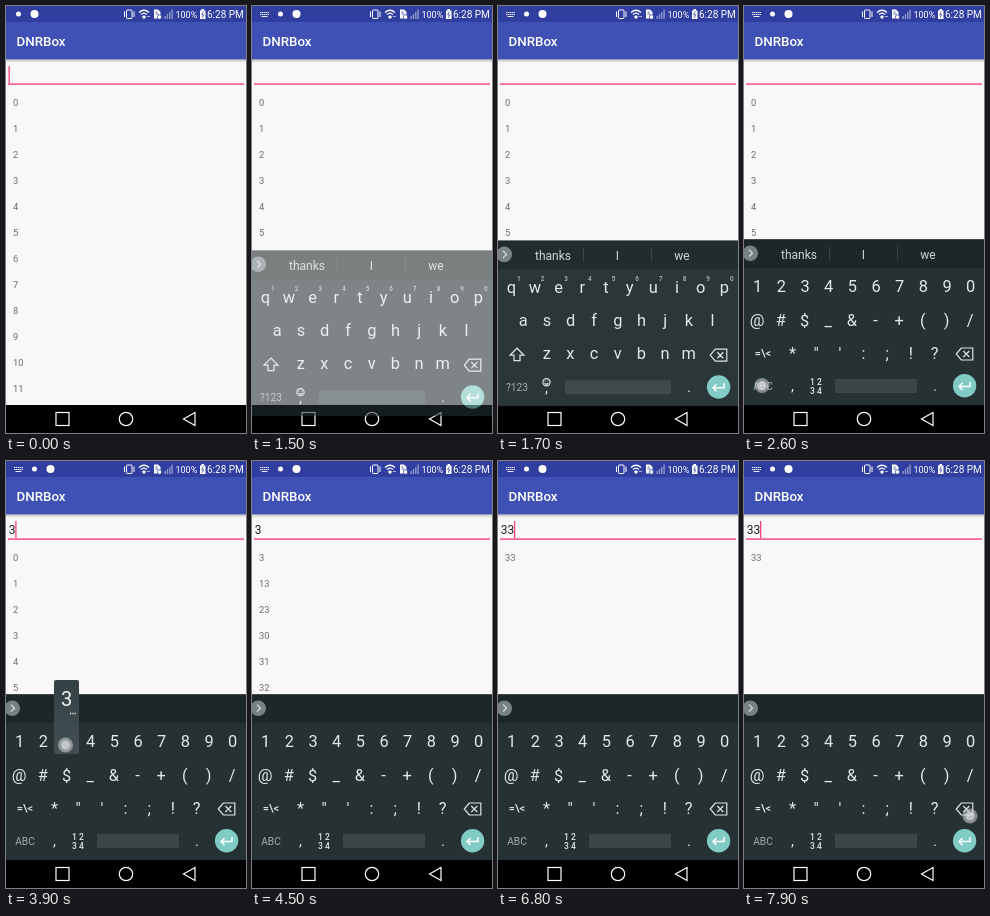
An HTML page for the animation above (8 s loop, 240 by 427 pixels).

```html
<!DOCTYPE html>
<html lang="en">
<head>
<meta charset="utf-8">
<title>List filter</title>
<style>
  html, body { margin: 0; width: 100%; height: 100%; overflow: hidden; background: #f8f8f8; }
  svg { display: block; width: 240px; height: 427px; font-family: Roboto, "Noto Sans", sans-serif; }
  .mid { text-anchor: middle; }
  .item { font-size: 9.33px; fill: #6c6c6c; }
  .key { font-size: 16.4px; fill: #e3e8e8; }
  .small { font-size: 10.2px; fill: #a3adae; }
  .hint { font-size: 6.4px; font-weight: 500; fill: #b4bcbd; }
  .word { font-size: 12px; fill: #cfd6d7; }
  .bold { font-weight: 500; }
  .line { fill: none; stroke: #dfe4e4; stroke-width: 1.2; }
</style>
</head>
<body>
<svg viewBox="0 0 240 427">
  <defs>
    <linearGradient id="shade" x2="0" y2="1">
      <stop stop-color="#000" stop-opacity=".25"/>
      <stop offset="1" stop-color="#000" stop-opacity="0"/>
    </linearGradient>
    <linearGradient id="bubble" x2="0" y2="1">
      <stop stop-color="#354245"/>
      <stop offset="1" stop-color="#434f52"/>
    </linearGradient>
  </defs>
  <rect width="240" height="427" fill="#f8f8f8"/>
  <g id="list"></g>
  <rect id="gap" y="233.400" width="240" height="166" fill="#f8f8f8"/>

  <rect x="2" y="77.400" width="236" height="1.400" fill="#f7407f"/>
  <text id="field" x="2.700" y="72.800" font-size="12" fill="#212121"></text>
  <rect id="caret" y="60" width="1.300" height="17" fill="#f7407f"/>

  <rect y="399" width="240" height="28" fill="#000"/>
  <g fill="none" stroke="#fff" stroke-width="1.200">
    <rect x="50" y="406.500" width="13" height="13"/>
    <circle cx="120" cy="413" r="6.700"/>
    <path d="M189 406.500v13l-11.500-6.500z"/>
  </g>

  <g id="keyboard">
    <rect y="233.400" width="240" height="165.600" fill="#263133"/>
    <rect y="233.400" width="240" height="28.600" fill="#1d2628"/>
    <g id="words">
      <path d="M85.500 240v15M153.500 240v15" stroke="#344042"/>
    </g>
    <circle cx="6.300" cy="247.200" r="7.800" fill="#778082"/>
    <path class="line" d="M5 243.700l3.500 3.500l-3.500 3.500" stroke-width="1.500"/>
    <g id="letters">
      <path class="line" d="M19 341l-7 7h4v5.500h6v-5.500h4z"/>
      <rect x="67" y="373" width="106" height="14" rx="1" fill="#3a4648"/>
      <g class="line" stroke-width=".9">
        <circle cx="48.500" cy="375" r="3.600"/>
        <path d="M46.600 376q1.900 2 3.800 0M47 373.500v.9M50 373.500v.9"/>
      </g>
    </g>
    <g id="symbols">
      <rect x="91" y="373" width="82" height="14" rx="1" fill="#3a4648"/>
    </g>
    <path class="line" d="M212.300 348l5-6h11.500v12h-11.500zM219.300 345l6 6M225.300 345l-6 6"/>
    <circle cx="220.600" cy="379.800" r="11.700" fill="#80cbc4"/>
    <path d="M226 376v4.500h-11M218.500 377l-3.500 3.500l3.500 3.500" fill="none" stroke="#fff" stroke-width="1.500"/>
  </g>

  <g id="popup">
    <rect x="48" y="219" width="25" height="74" rx="2" fill="url(#bubble)"/>
    <text class="mid" x="60.500" y="245" font-size="20" fill="#eef1f2">3</text>
    <path d="M64 252.500h1.300m1 0h1.300m1 0h1.300" stroke="#dfe4e6" stroke-width="1.300"/>
  </g>
  <g id="touch">
    <circle r="7.500" fill="#c6cacb" fill-opacity=".6"/>
    <circle r="4.500" fill="#e6e8e8" fill-opacity=".6"/>
  </g>

  <rect y="53" width="240" height="4" fill="url(#shade)"/>
  <rect width="240" height="53.300" fill="#3f51b5"/>
  <rect width="240" height="16" fill="#303f9f"/>
  <text x="10.500" y="40" font-size="13.33" font-weight="500" fill="#fff">DNRBox</text>

  <g id="typing" fill="none" stroke="#e8eaf6">
    <path d="M8 6.500h9M8 8.500h9" stroke-dasharray="1.500 .4"/>
    <path d="M9.500 10.500h6"/>
  </g>
  <g id="notes" fill="#fff">
    <circle cx="12.500" cy="8" r="2.500"/>
    <circle cx="28.500" cy="8" r="4"/>
  </g>
  <g fill="none" stroke="#fff">
    <rect x="120.500" y="4" width="5.500" height="8.500" rx=".8"/>
    <path d="M118.500 5.500v5.500M128 5.500v5.500"/>
    <path d="M133 6.500q5-4.500 10 0M135 8.500q3-2.700 6 0" stroke-width="1.300"/>
    <path d="M138 9.500l1.800 1.300l-1.800 2l-1.800-2zM141 10.500h3" fill="#fff" stroke-width=".6"/>
    <path d="M148 3.500h4l2.500 2.500v6.500h-6.500z" fill="#fff" stroke="none"/>
    <path d="M149.500 6h2M149.500 8h3" stroke="#303f9f" stroke-width=".8"/>
    <circle cx="153.500" cy="11" r="2.200" fill="#fff" stroke="#303f9f" stroke-width=".7"/>
    <path d="M159.200 10v3M161.500 8v5M163.800 6v7M166.100 3.500v9.500" stroke="#8e98ce" stroke-width="1.400"/>
    <path d="M194 4.500h1.500v-1.500h2.500v1.500h1.500v8.500h-5.500z" fill="#fff" stroke="none"/>
    <path d="M197.300 5.500l-1.600 3.300h2l-1.500 3" stroke="#303f9f" stroke-width=".8"/>
  </g>
  <text x="169.500" y="11.500" font-size="9" fill="#fff">100%</text>
  <text x="201" y="12" font-size="10" fill="#fff">6:28 PM</text>
</svg>
<script>
const LOOP = 8000;
const SVG = "http://www.w3.org/2000/svg";
const $ = id => document.getElementById(id);

function addText(parent, text, x, y, cls, size) {
  const el = document.createElementNS(SVG, "text");
  el.textContent = text;
  el.setAttribute("x", x);
  el.setAttribute("y", y);
  el.setAttribute("class", cls);
  if (size) el.style.fontSize = size + "px";
  parent.appendChild(el);
  return el;
}

function addKeys(parent, chars, x, y, cls = "key mid") {
  [...chars].forEach((c, i) => addText(parent, c, x + i * 23.67, y, cls));
}

const letters = $("letters"), symbols = $("symbols"), words = $("words");
addKeys(letters, "qwertyuiop", 13.3, 285.5);
addKeys(letters, "1234567890", 20.8, 273.5, "hint mid");
addKeys(letters, "asdfghjkl", 25.2, 318.5);
addKeys(letters, "zxcvbnm", 48.7, 352);
addText(letters, "?123", 19, 384, "small mid");
addText(letters, ",", 48.5, 386, "key mid", 15);
addText(letters, ".", 191, 384.5, "key mid", 15);

addKeys(symbols, "1234567890", 13.7, 286);
addKeys(symbols, "@#$_&-+()/", 13.2, 319.5);
addText(symbols, "=\\<", 19, 351, "key mid bold", 11);
addKeys(symbols, "*\"':;!?", 48.5, 353);
addText(symbols, "ABC", 19, 383.5, "small mid");
addText(symbols, ",", 48.5, 384.5, "key mid", 15);
addText(symbols, "1 2", 72, 378.5, "key mid bold", 8.5);
addText(symbols, "3 4", 72, 387.5, "key mid bold", 8.5);
addText(symbols, ".", 191, 384.5, "key mid", 15);

addText(words, "thanks", 55, 252.5, "word mid");
addText(words, "I", 119.5, 252.5, "word mid");
addText(words, "we", 184, 252.5, "word mid");

const items = Array.from({ length: 34 }, (_, n) => addText($("list"), n, 7, 0, "item"));
const matches = items.map((_, n) => n).filter(n => String(n).includes("3"));

// x, y, press, end
const touches = [
  [18, 379.5, 2300, 2900],
  [59.5, 284, 3800, 4150],
  [59.5, 284, 5700, 5880],
  [226, 355, 7800, 8200]
];

const ramp = (t, a, b) => Math.min(1, Math.max(0, (t - a) / (b - a)));
const ease = p => (1 - Math.cos(Math.PI * p)) / 2;
const mix = (a, b, p) => a + (b - a) * p;
const rowY = i => 100 + 26 * i;
const show = (el, on) => { el.style.display = on ? "" : "none"; };

function drawList(t) {
  const moveA = ease(ramp(t, 4000, 4300));
  const moveB = ease(ramp(t, 5900, 6200));
  const fadeA = 1 - ramp(t, 3900, 4000);
  const fadeB = 1 - ramp(t, 5800, 5900);
  items.forEach((el, n) => {
    const i = matches.indexOf(n);
    let y = rowY(n), alpha = fadeA;
    if (i >= 0) {
      y = mix(y, rowY(i), moveA);
      alpha = fadeB;
    }
    if (n === 33) {
      y = mix(y, rowY(0), moveB);
      alpha = 1;
    }
    el.setAttribute("y", y.toFixed(2));
    el.style.opacity = alpha;
  });
}

function drawField(t) {
  const text = t < 3900 ? "" : t < 5800 ? "3" : "33";
  const phase = t < 5800 ? t + 100 : t - 5800;
  $("field").textContent = text;
  $("caret").setAttribute("x", 2.5 + text.length * 6.74);
  show($("caret"), phase % 1000 < 500);
}

function drawKeyboard(t) {
  const left = 1 - ramp(t, 1380, 1800);
  const kb = $("keyboard");
  kb.setAttribute("transform", `translate(0 ${(22 * left ** 2).toFixed(2)})`);
  kb.style.opacity = 1 - left ** 2.5;
  show(kb, left < 1);
  show($("gap"), t >= 1400);
  show(letters, t < 2600);
  show(symbols, t >= 2600);
  show(words, t < 3900);
  show($("popup"), (t >= 3800 && t < 4050) || (t >= 5700 && t < 5880));
}

function drawTouch(t) {
  const hit = touches.find(([, , a, b]) => t >= a && t < b);
  show($("touch"), hit);
  if (!hit) return;
  const [x, y, , end] = hit;
  $("touch").setAttribute("transform", `translate(${x} ${y})`);
  $("touch").style.opacity = 1 - ramp(t, end - 150, end);
}

function drawStatus(t) {
  const open = t >= 1500;
  show($("typing"), open);
  $("notes").setAttribute("transform", `translate(${open ? 16 : 0} 0)`);
}

function draw(t) {
  drawList(t);
  drawField(t);
  drawKeyboard(t);
  drawTouch(t);
  drawStatus(t);
}

const start = performance.now();
function tick() {
  draw((performance.now() - start) % LOOP);
  requestAnimationFrame(tick);
}
tick();
</script>
</body>
</html>
```
